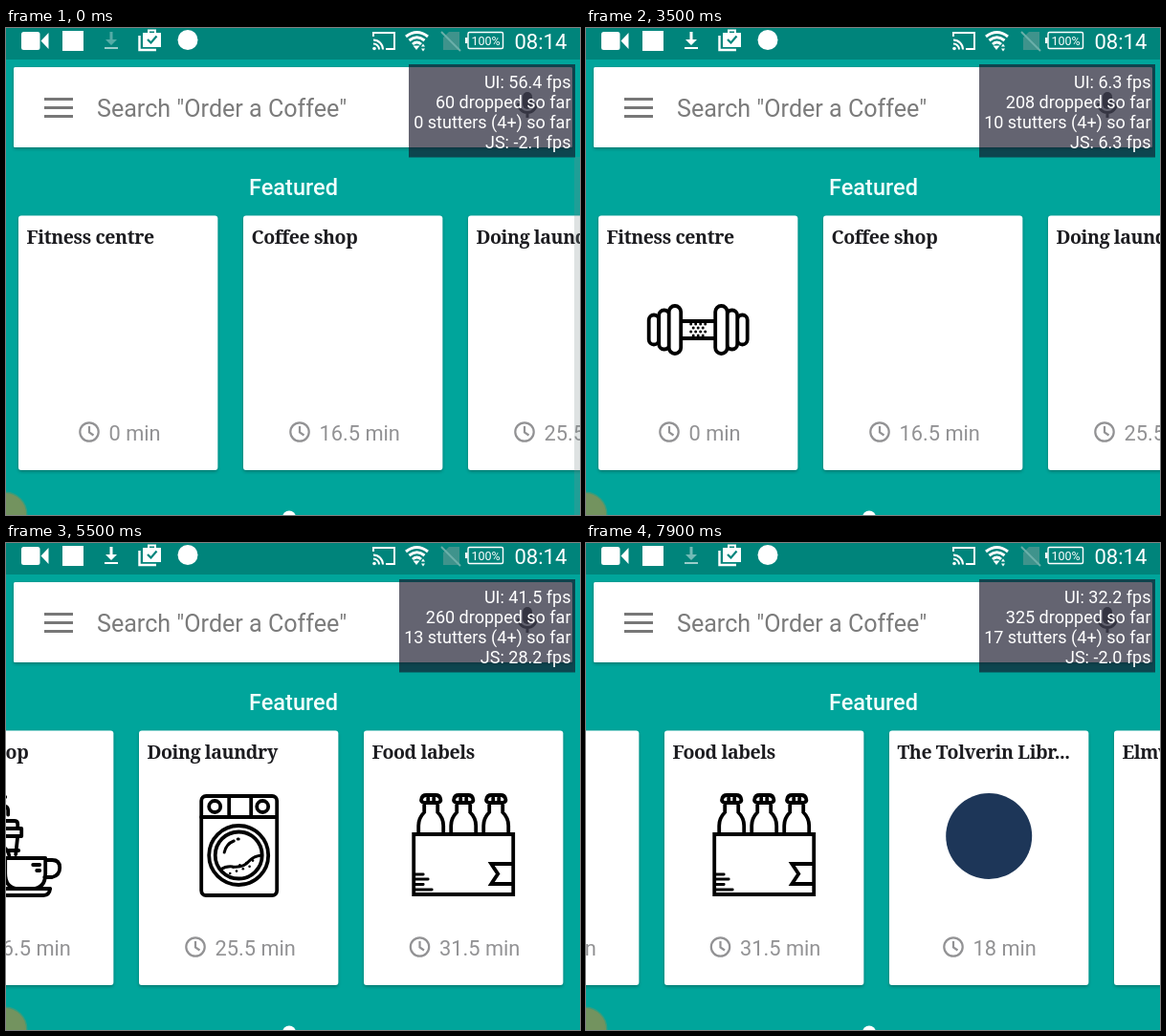
Recreate the animation shown at these times as an HTML page. Size 600 by 510 pixels, loop 8000 ms.

```html
<!DOCTYPE html>
<html lang="en">
<head>
<meta charset="utf-8">
<title>Featured cards</title>
<style>
html, body { margin: 0; width: 100%; height: 100%; overflow: hidden; background: #00a59b; }
svg { display: block; width: 100vw; height: 100vh; font-family: Roboto, sans-serif; }
.title { font: bold 19.5px "Noto Serif", serif; letter-spacing: -.4px; fill: #1c1c20; }
.mins { font-size: 21.8px; fill: #929294; }
.line { fill: none; stroke: #000; stroke-width: 3.8; stroke-linecap: round; stroke-linejoin: round; }
.thin { fill: none; stroke: #fff; stroke-width: 2; }
</style>
</head>
<body>
<svg viewBox="0 0 600 510">
  <defs>
    <filter id="soft" x="-10%" y="-10%" width="120%" height="125%">
      <feDropShadow dx="0" dy="1.500" stdDeviation="1.800" flood-color="#003a36" flood-opacity=".45"/>
    </filter>
  </defs>
  <rect width="600" height="510" fill="#00a59b"/>
  <rect width="600" height="33" fill="#00847b"/>

  <g id="status" fill="#fff">
    <rect x="16" y="4" width="19.500" height="19" rx="2.500"/>
    <path d="M36.500 13.500L44.500 5V22Z"/>
    <rect x="59" y="3" width="22" height="21"/>
    <g id="load">
      <path id="arrow" d="M108.500 4h3v8h4.500l-6 6-6-6h4.500Z"/>
      <rect x="103" y="20" width="14" height="2"/>
    </g>
    <path class="thin" d="M139.500 8V23H157" style="stroke-width:2.400"/>
    <path d="M143 5h5V1.500h9V5h5V20H143ZM150 5h5V3.500h-5Z" fill-rule="evenodd"/>
    <path d="M148 12l3.500 3.500 6-7" fill="none" stroke="#00847b" stroke-width="2.200"/>
    <circle cx="190" cy="12.500" r="10.500"/>
    <path class="thin" d="M384 9V5H406V22H397M384 12.500a10 10 0 0 1 10 10M384 16.500a6 6 0 0 1 6 6"/>
    <circle cx="385" cy="21.500" r="1.800"/>
    <path class="thin" d="M418 9q11.500-9 23 0M421.500 13q8-6.500 16 0M425 17q4.500-4 9 0" style="stroke-width:3"/>
    <path d="M425.500 18.500h7l-3.500 4.500ZM434 19.500l2-3 2 3ZM434 21.500l2 3 2-3Z"/>
    <path d="M463 4h11V23H457V10Z" fill="#3f938c"/>
    <path d="M455 4L475 24" stroke="#6bb0aa" stroke-width="2"/>
    <rect class="thin" x="483" y="4.500" width="36.500" height="17" rx="1.500" style="stroke-width:1.400"/>
    <rect x="480" y="10" width="2.500" height="6"/>
    <text x="501.500" y="17.500" font-size="12.500" text-anchor="middle">100%</text>
    <text x="531.500" y="22" font-size="22">08:14</text>
  </g>

  <rect x="8" y="41" width="584" height="84" rx="1.500" fill="#fff" filter="url(#soft)"/>
  <path d="M40 74.500h30M40 83.500h30M40 92.500h30" stroke="#777" stroke-width="3"/>
  <text x="95" y="93" font-size="25.100" fill="#7b7b7b">Search "Order a Coffee"</text>
  <g fill="none" stroke="#757575" stroke-width="3">
    <rect x="540" y="67" width="10" height="18" rx="5" fill="#757575" stroke="none"/>
    <path d="M535.500 79a9.500 9.500 0 0 0 19 0M545 88.500V94"/>
  </g>

  <text x="300.500" y="175" font-size="23.500" font-weight="500" fill="#f2fffd" text-anchor="middle">Featured</text>
  <g id="cards"></g>

  <circle cx="296" cy="512.500" r="7" fill="#fff"/>
  <circle cx="-1" cy="509" r="22" fill="#73935f" stroke="#73935f" stroke-opacity=".5" stroke-width="3"/>
  <rect id="bar" x="594" y="135" width="6" height="375" fill="#7d8b8a"/>

  <rect id="panel" y="38" height="97.500" fill="#141428" fill-opacity=".66"/>
  <g id="stats" fill="#fff" font-size="18" text-anchor="end"></g>
</svg>
<script>
const LOOP = 8000, STEP = 100;
const PITCH = 235;
const NS = "http://www.w3.org/2000/svg";
const $ = id => document.getElementById(id);
const clamp = v => Math.max(0, Math.min(1, v));

// Icons are drawn around the centre of a card picture.
function dumbbell() {
  const plate = (x, w, h) =>
    [x, -x - w].map(a => `<rect x="${a}" y="${-h / 2}" width="${w}" height="${h}" rx="${w / 2}" fill="#fff"/>`).join("");
  let dots = "";
  for (let r = 0; r < 4; r++)
    for (let c = 0; c < 4 - r % 2; c++)
      dots += `<circle cx="${-7.5 + c * 5 + r % 2 * 2.5}" cy="${-6 + r * 4}" r="1.5"/>`;
  return `<g class="line"><path d="M-18-9H18M-18 9H18"/>${plate(41, 10.5, 31)}${plate(30, 11, 41)}${plate(18, 12.5, 50)}</g>${dots}`;
}

function coffee() {
  return `<g class="line">
    <path d="M-9-50H-23q-7 0-7 5t7 4.500h12q5 0 5 5v4M-18-50q8 0 8 4.500"/>
    <path d="M-44-17V-22q0-3 4-3H0q4 0 4 3v5M-49-17H8V-9H-49ZM-30-17h18"/>
    <path d="M-45-9L-39 52H-9M4-9L2 10M-45 6H-35M-5 6H5M-45 6l2 22h13"/>
    <path d="M-10 24a13 13 0 1 1 5-13M-14 20a8 8 0 1 1 0-10"/>
    <path d="M-9 14H33V30Q33 46 19 46H5Q-9 46-9 30ZM33 16h7q8 0 8 8t-8 10h-8M20 21h7M24 27h3"/>
    <path d="M-14 46H38q-1 7-7 7H-7q-6 0-7-7Z" fill="#fff"/></g>`;
}

function washer() {
  let dots = "";
  for (let i = 0; i < 8; i++)
    dots += `<circle cx="${-9 + i * 3.4}" cy="${30 - i * 1.2 - i % 2 * 5}" r="1.300"/>`;
  return `<g class="line"><rect x="-39" y="-51" width="79" height="104" rx="5"/>
    <path d="M-39-29H40M-10-51V-29M13-51V-29"/>
    <circle cx="-25" cy="-40" r="6"/><circle cx="25" cy="-40" r="6"/>
    <circle cy="11" r="31"/><circle cy="11" r="24.500"/>
    <path d="M-19 26q6-4 13-3Q5 24 10 18t14-7M-15 8q2-9 10-12M-1-6h1" style="stroke-width:3"/></g>${dots}`;
}

function crate() {
  const bottle = x => `<path transform="translate(${x} 0)" d="M-7-44q-4-1-3-4 1-4 5-4H5q4 0 5 4 1 3-3 4ZM-7-44V-34Q-13-28-13-20V-11M7-44V-34Q13-28 13-20V-11M-3-49v3M3-49v3"/>`;
  return `<g class="line" style="stroke-linejoin:miter">${[-34, 0, 34].map(bottle).join("")}
    <path d="M-52-11H52V52H-52ZM52 20H29l7 10.500-7 10.500H52"/>
    <path d="M-51 31h9M-51 36h14M-51 41.500h9M-51 47h18" style="stroke-width:2.800"/></g>`;
}

const seal = () => `<circle cy="-9" r="45" fill="#1d3658"/>`;

const cards = [
  { title: "Fitness centre", mins: "0", clock: 74, icon: dumbbell, at: 2800 },
  { title: "Coffee shop", mins: "16.5", clock: 59, icon: coffee, at: 3700, spin: true },
  { title: "Doing laundry", mins: "25.5", clock: 59, icon: washer, at: 3900, spin: true },
  { title: "Food labels", mins: "31.5", clock: 58.5, icon: crate, at: 4000 },
  { title: "The Tolverin Libr...", mins: "18", clock: 67, icon: seal, at: 4200 },
  { title: "Elmwood Hall", mins: "21", clock: 67, icon: () => "", at: 4200 }
];

for (const [i, c] of cards.entries()) {
  const g = document.createElementNS(NS, "g");
  g.setAttribute("transform", `translate(${13 + i * PITCH} 0)`);
  g.innerHTML = `<rect y="196.500" width="208.300" height="266.500" rx="3" fill="#fff" filter="url(#soft)"/>
    <text class="title" x="8.500" y="226">${c.title}</text>
    <g fill="none" stroke="#929294" stroke-width="2.200">
      <circle cx="${c.clock}" cy="423" r="9.700"/><path d="M${c.clock} 417v6.500l4.500 3"/></g>
    <text class="mins" x="${c.clock + 20.5}" y="431.500">${c.mins} min</text>
    <g class="pic" transform="translate(104.200 316)">${c.icon()}</g>
    <path class="spin" fill="none" stroke="#0b9a86" stroke-width="3"/>`;
  $("cards").append(g);
  c.pic = g.querySelector(".pic");
  c.ring = g.querySelector(".spin");
}

// Start time, UI rate, dropped, stutters, JS rate.
const readings = [
  [0, 56.4, 60, 0, -2.1], [500, 30.2, 80, 0, 12.1], [1000, 14.1, 103, 1, 14.1],
  [1500, 18.8, 126, 2, 18.8], [2000, 10.2, 147, 4, 10.2], [2400, 8, 168, 6, 8],
  [3000, 7.5, 187, 8, 7.5], [3500, 6.3, 208, 10, 6.3], [4000, 20.4, 226, 11, 18.8],
  [4500, 38.3, 235, 12, -2], [5000, 49.6, 242, 12, 36.1], [5500, 41.5, 260, 13, 28.2],
  [6000, 37.8, 272, 14, 11], [6400, 36.2, 279, 15, -2], [7000, 47, 286, 15, 9.4],
  [7400, 39.3, 307, 16, 21.4], [7800, 32.2, 325, 17, -2]
];
const rows = [63, 84, 104.5, 125.5].map(y => {
  const row = document.createElementNS(NS, "text");
  row.setAttribute("x", 590.5);
  row.setAttribute("y", y);
  $("stats").append(row);
  return row;
});

// A swipe: quick drag, then a long slowing glide.
const swipe = (t, start, a, b) => 1 - (1 - clamp((t - start) / 1000) ** a) ** b;
const scrollAt = t => 364 * swipe(t, 4700, 1.6, 2.4) + 272 * swipe(t, 6700, 1.3, 2.9);

function ringPath(t) {
  const k = clamp((Math.min(t, 2400) - 1600) / 800);
  const from = 1.42 + k * 2.6, to = from + .2 + k * 3.4, r = 23.5;
  const point = a => `${104.5 + r * Math.cos(a)} ${316 + r * Math.sin(a)}`;
  return `M${point(from)}A${r} ${r} 0 ${to - from > Math.PI ? 1 : 0} 1 ${point(to)}`;
}

function showStats(t) {
  const [, ui, dropped, stutters, js] = readings.filter(r => r[0] <= t).pop();
  const lines = [`UI: ${ui.toFixed(1)} fps`, `${dropped} dropped so far`,
    `${stutters} stutters (4+) so far`, `JS: ${js.toFixed(1)} fps`];
  rows.forEach((row, i) => row.textContent = lines[i]);
  const left = stutters > 9 ? 411 : 421;
  $("panel").setAttribute("x", left);
  $("panel").setAttribute("width", 595 - left);
}

function draw(t) {
  $("cards").setAttribute("transform", `translate(${-Math.round(scrollAt(t))} 0)`);
  for (const c of cards) {
    c.pic.setAttribute("opacity", clamp((t - c.at + STEP) / 300));
    const busy = c.spin && t >= 1600 && t < 2800;
    c.ring.setAttribute("d", busy ? ringPath(t) : "");
  }
  const phase = t % 720, bright = phase >= 450 && phase < 640;
  $("load").setAttribute("opacity", bright ? 1 : .6);
  $("arrow").setAttribute("opacity", bright ? 1 : .55 + .2 * phase / 720);
  $("bar").setAttribute("opacity", .25 * (1 - clamp((t - 300) / 600)));
  showStats(t);
}

function tick(now) {
  draw(Math.floor(now % LOOP / STEP) * STEP);
  requestAnimationFrame(tick);
}
draw(0);
requestAnimationFrame(tick);
</script>
</body>
</html>
```
